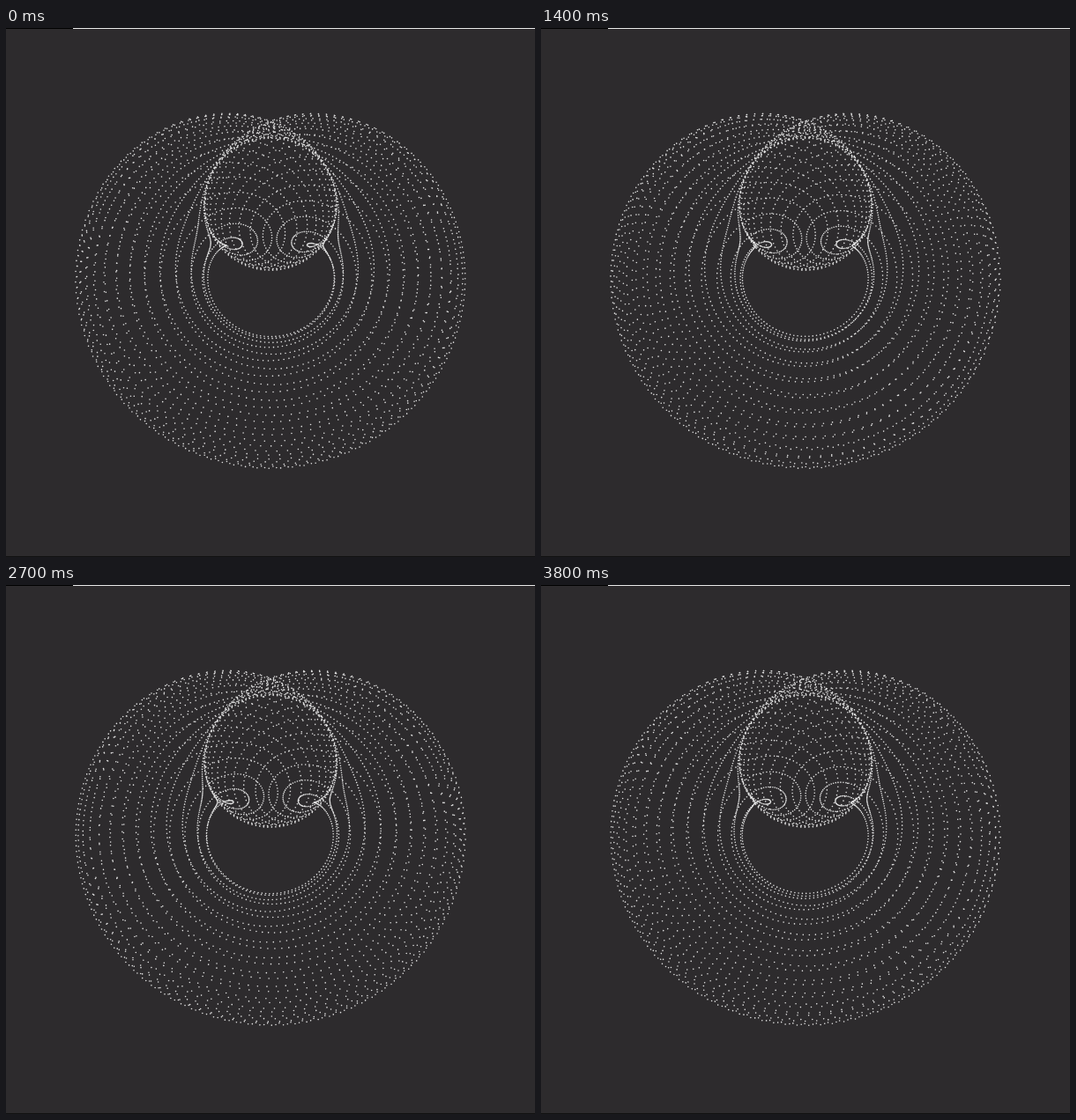
Recreate the animation shown at these times as an HTML page with a canvas. Size 600 px wide and 601 px high, loop 3900 ms.

```html
<!DOCTYPE html>
<html lang="en">
<head>
<meta charset="utf-8">
<title>Dotted cardioid tube</title>
<style>
html, body { margin: 0; width: 100%; height: 100%; overflow: hidden; background: #2d2b2d; }
canvas { display: block; width: 600px; height: 601px; }
</style>
</head>
<body>
<canvas id="stage" width="600" height="601"></canvas>
<script>
const ctx = document.getElementById('stage').getContext('2d');
const TAU = Math.PI * 2;
const LOOP = 3900, STEP = 100;
const CUSP = { x: 300, y: 200.3 };
const TUBE = 75;           // radius of each dotted circle
const SIZE = TUBE * 1.5;   // cardioid scale
const CIRCLES = 160;       // circles along the cardioid
const DOTS = 26;           // dots on each circle
const TWIST = 40 / DOTS;   // turns of a circle per trip round the cardioid
const PERIOD = 591;        // time to turn by one dot
const DOT_R = 0.8;

function dot(x, y) {
  ctx.moveTo(x + DOT_R, y);
  ctx.arc(x, y, DOT_R, 0, TAU);
}

function bar(color, x, y, w, h) {
  ctx.fillStyle = color;
  ctx.fillRect(x, y, w, h);
}

function draw(ms) {
  bar('#2d2b2d', 0, 0, 600, 601);
  bar('#000', 0, 0, 76, 1);
  bar('#e9e9e9', 76, 0, 524, 1);
  bar('#111', 0, 600, 600, 1);

  const turn = 0.27 - ms / PERIOD;
  ctx.beginPath();
  for (let i = 0; i < CIRCLES; i++) {
    const u = (i + 0.5) / CIRCLES * TAU;
    const r = SIZE * (1 - Math.cos(u));
    const cx = CUSP.x - r * Math.sin(u);
    const cy = CUSP.y - r * Math.cos(u);
    const lean = Math.PI + TWIST * (u - Math.PI);
    for (let j = 0; j < DOTS; j++) {
      const a = lean + (j + turn) / DOTS * TAU;
      dot(cx + TUBE * Math.sin(a), cy + TUBE * Math.cos(a));
    }
  }
  ctx.fillStyle = '#e2e2e2';
  ctx.fill();
}

const start = performance.now();
function tick() {
  const ms = (performance.now() - start) % LOOP;
  draw(Math.floor(ms / STEP) * STEP);
  requestAnimationFrame(tick);
}
tick();
</script>
</body>
</html>
```
